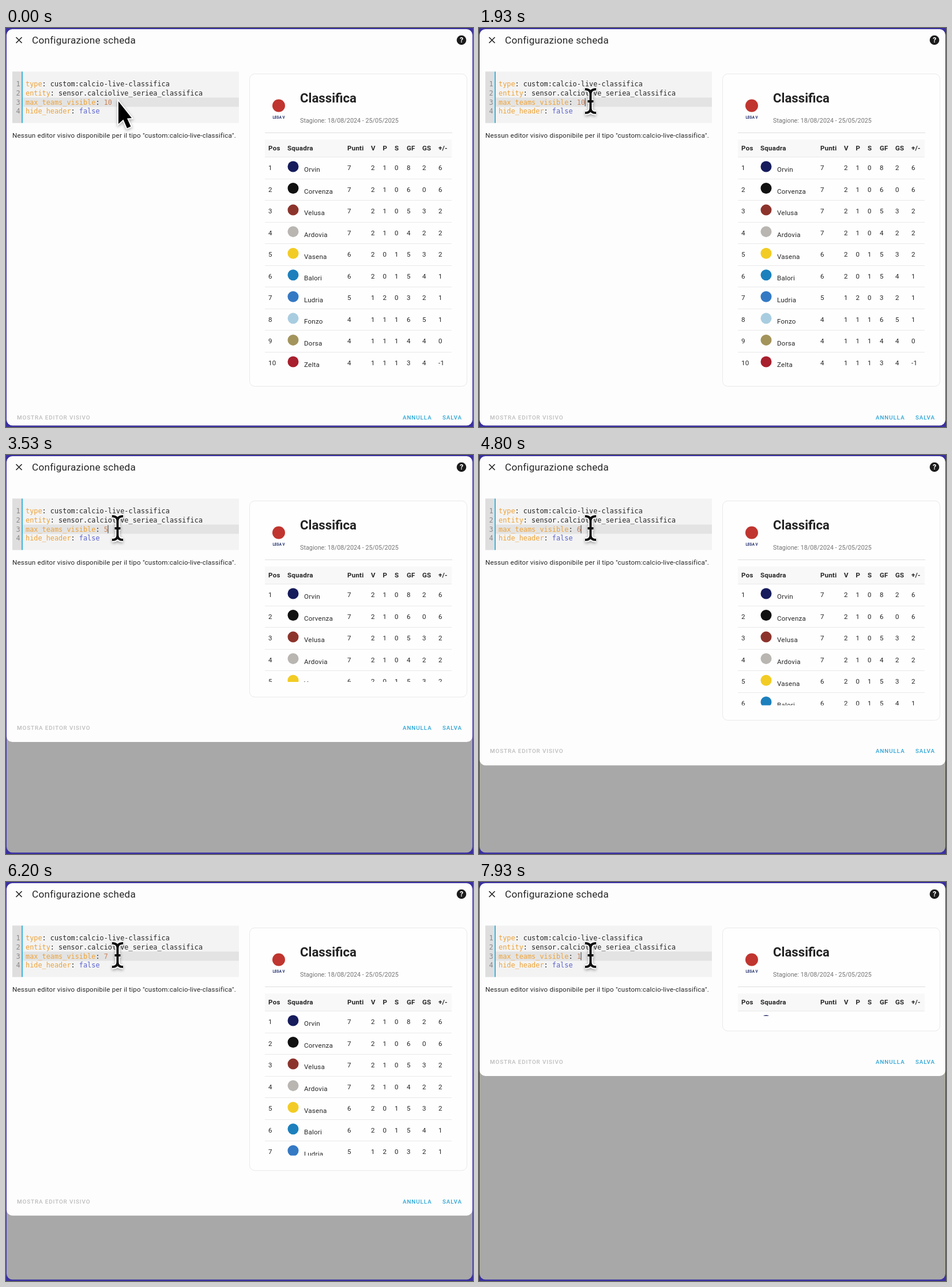
These frames come from a looping animation (810 by 691 pixels, 8000 ms). An HTML page with a canvas:

```html
<!DOCTYPE html>
<html lang="it">
<head>
<meta charset="utf-8">
<title>Configurazione scheda</title>
<style>
html, body { margin: 0; width: 100%; height: 100%; overflow: hidden; background: #3a30a0; }
canvas { display: block; width: 810px; height: 691px; }
</style>
</head>
<body>
<canvas id="stage"></canvas>
<script>
const W = 810, H = 691, LOOP = 8000;
const canvas = document.getElementById('stage');
const ratio = window.devicePixelRatio || 1;
canvas.width = W * ratio;
canvas.height = H * ratio;
const ctx = canvas.getContext('2d');

const SANS = 'Roboto, sans-serif';
const MONO = '"DejaVu Sans Mono", monospace';
const INK = '#262626', KEY = '#eea236';

// [start ms, typed value]; an erased value falls back to ALL_ROWS
const EDITS = [
  [0, '10'], [2100, '1'],
  [2900, ''], [3150, '5'],
  [4150, ''], [4400, '6'],
  [5300, ''], [5550, '7'],
  [7500, ''], [7800, '1']
];
const ALL_ROWS = 10;
const BEAM_AT = 1500;
const BLINK = 600;

// name, badge colour, points, won, drawn, lost, scored, conceded, difference
const TEAMS = [
  ['Orvin', '#161c5c', 7, 2, 1, 0, 8, 2, 6],
  ['Corvenza', '#111111', 7, 2, 1, 0, 6, 0, 6],
  ['Velusa', '#8c342c', 7, 2, 1, 0, 5, 3, 2],
  ['Ardovia', '#b9b6b2', 7, 2, 1, 0, 4, 2, 2],
  ['Vasena', '#f2cc24', 6, 2, 0, 1, 5, 3, 2],
  ['Balori', '#1c80bd', 6, 2, 0, 1, 5, 4, 1],
  ['Ludria', '#3479c4', 5, 1, 2, 0, 3, 2, 1],
  ['Fonzo', '#a9cde0', 4, 1, 1, 1, 6, 5, 1],
  ['Dorsa', '#a3945c', 4, 1, 1, 1, 4, 4, 0],
  ['Zelta', '#a81f2d', 4, 1, 1, 1, 3, 4, -1]
];
const HEADS = ['Pos', 'Squadra', 'Punti', 'V', 'P', 'S', 'GF', 'GS', '+/-'];
const COLS = [455, 488, 592, 633, 653.5, 674, 695, 722, 750];

function rect(x, y, w, h, color) {
  ctx.fillStyle = color;
  ctx.fillRect(x, y, w, h);
}

function roundPath(x, y, w, h, r) {
  ctx.beginPath();
  ctx.roundRect(x, y, w, h, r);
}

function disc(x, y, r, color) {
  ctx.fillStyle = color;
  ctx.beginPath();
  ctx.arc(x, y, r, 0, Math.PI * 2);
  ctx.fill();
}

function text(str, x, y, size, color = INK, { weight = 400, family = SANS, spacing = 0, align = 'left' } = {}) {
  ctx.font = `${weight} ${size}px ${family}`;
  ctx.letterSpacing = size * spacing + 'px';
  ctx.textAlign = align;
  ctx.fillStyle = color;
  ctx.fillText(str, x, y);
}

const body = (str, x, y, weight = 400) => text(str, x, y, 11.62, INK, { weight, spacing: 0.0178 });
const button = (str, x, y, color) => text(str, x, y, 9.9, color, { weight: 500, spacing: 0.0893 });

function drawTitle() {
  ctx.strokeStyle = INK;
  ctx.lineWidth = 1.7;
  ctx.beginPath();
  ctx.moveTo(17.5, 16); ctx.lineTo(27.5, 26);
  ctx.moveTo(27.5, 16); ctx.lineTo(17.5, 26);
  ctx.stroke();
  text('Configurazione scheda', 45, 27, 17.2, INK, { spacing: 0.0125 });
  disc(790, 21, 8.3, '#1c1c1c');
  text('?', 790, 25.4, 12.5, '#fff', { weight: 700, align: 'center' });
}

function drawEditor(value, caret) {
  rect(11, 75.5, 393, 89, '#f3f3f3');
  rect(11, 75.5, 16, 89, '#dedede');
  rect(29, 120.5, 375, 16, '#e3e3e3');
  rect(27, 75.5, 2, 89, '#3fb4d9');

  const charW = 7.14;
  const lines = [
    ['type', 'custom:calcio-live-classifica', INK],
    ['entity', 'sensor.calciolive_seriea_classifica', INK],
    ['max_teams_visible', value, '#c9825a'],
    ['hide_header', 'false', '#5a62cf']
  ];
  lines.forEach(([key, val, color], i) => {
    const y = 101 + i * 15.75;
    const code = (str, x, tint) => text(str, x, y, 11.86, tint, { family: MONO });
    code(String(i + 1), 17.5, '#8a8a8a');
    code(key, 34, KEY);
    code(':', 34 + key.length * charW, INK);
    code(val, 34 + (key.length + 2) * charW, color);
  });
  if (caret) rect(33.7 + (19 + value.length) * charW, 121.5, 1, 14, '#333');

  body('Nessun editor visivo disponibile per il tipo "custom:calcio-live-classifica".', 11, 190);
}

function drawCard(bottom) {
  roundPath(422.5, 79.5, 377, bottom - 79.5, 9);
  ctx.fillStyle = '#fefefe';
  ctx.fill();
  ctx.strokeStyle = '#e9e9e9';
  ctx.lineWidth = 1;
  ctx.stroke();

  disc(473, 134.5, 11, '#c0352f');
  text('LEGA V', 473, 156.5, 6.3, '#20306c', { weight: 700, align: 'center' });
  text('Classifica', 510, 129, 22.2, '#222', { weight: 700 });
  text('Stagione: 18/08/2024 - 25/05/2025', 510, 163.7, 10.8, '#747474');
  rect(449, 181, 325, 1, '#dedede');

  ctx.save();
  ctx.beginPath();
  ctx.rect(423, 182, 376, bottom - 26 - 182);
  ctx.clip();
  rect(449, 193, 324, 30, '#f8f8f8');
  rect(449, 223, 324, 1, '#e9e9e9');
  HEADS.forEach((head, i) => body(head, COLS[i], 212, 700));
  TEAMS.forEach(drawTeam);
  ctx.restore();
}

function drawTeam([name, color, ...stats], i) {
  const mid = 242 + i * 37.55;
  body(String(i + 1), COLS[0], mid + 4);
  disc(498, mid - 2, 9.5, color);
  body(name, 517, mid + 7.3);
  stats.forEach((n, k) => body(String(n), COLS[k + 2], mid + 4));
  if (i < TEAMS.length - 1) rect(449, Math.round(mid + 18.6), 324, 1, '#e9e9e9');
}

function shadowed(paint) {
  ctx.save();
  ctx.shadowColor = 'rgba(0,0,0,.35)';
  ctx.shadowBlur = 5 * ratio;
  ctx.shadowOffsetY = 2 * ratio;
  paint();
  ctx.restore();
}

function drawArrow() {
  const outline = [[195, 127], [195, 166], [203.5, 158.5], [210, 173.5], [216.5, 170.5], [210, 156.5], [218, 156]];
  ctx.beginPath();
  outline.forEach(([x, y]) => ctx.lineTo(x, y));
  ctx.closePath();
  ctx.lineJoin = 'miter';
  ctx.strokeStyle = '#fff';
  ctx.lineWidth = 3.5;
  shadowed(() => ctx.stroke());
  ctx.fillStyle = '#000';
  ctx.fill();
}

function drawBeam() {
  ctx.beginPath();
  ctx.moveTo(184, 106);
  ctx.quadraticCurveTo(193.5, 106, 193.5, 114);
  ctx.quadraticCurveTo(193.5, 106, 203, 106);
  ctx.moveTo(193.5, 113);
  ctx.lineTo(193.5, 140);
  ctx.moveTo(184, 147);
  ctx.quadraticCurveTo(193.5, 147, 193.5, 139);
  ctx.quadraticCurveTo(193.5, 147, 203, 147);
  ctx.moveTo(188.5, 127);
  ctx.lineTo(198.5, 127);
  ctx.lineJoin = 'round';
  ctx.strokeStyle = '#fff';
  ctx.lineWidth = 8;
  shadowed(() => ctx.stroke());
  ctx.strokeStyle = '#111';
  ctx.lineWidth = 4;
  ctx.stroke();
}

function draw(t) {
  const [since, value] = EDITS.findLast(([start]) => start <= t);
  const rows = Number(value) || ALL_ROWS;
  const focused = t >= BEAM_AT;
  const focusTime = Math.max(since, BEAM_AT);
  const caret = focused && Math.floor((t - focusTime) / BLINK) % 2 === 0;
  const cardBottom = 258 + 40.28 * (rows - 1);
  const bottom = cardBottom + 78;

  ctx.setTransform(ratio, 0, 0, ratio, 0, 0);
  rect(0, 0, W, H, '#3a30a0');
  ctx.save();
  roundPath(1, 2, 808, 686.5, 10);
  ctx.clip();
  rect(0, 0, W, H, '#a8a8a8');
  roundPath(1, 2, 808, Math.min(bottom, 688.5) - 2, 10);
  ctx.fillStyle = '#fdfdfd';
  ctx.fill();

  drawTitle();
  drawEditor(value, caret);
  drawCard(cardBottom);
  button('MOSTRA EDITOR VISIVO', 19, bottom - 21, '#bdbdbd');
  button('ANNULLA', 688, bottom - 21, '#2ba4d6');
  button('SALVA', 757, bottom - 21, '#2ba4d6');
  ctx.restore();

  if (focused) drawBeam();
  else drawArrow();
}

const began = performance.now();
function tick() {
  draw((performance.now() - began) % LOOP);
  requestAnimationFrame(tick);
}
tick();
</script>
</body>
</html>
```
